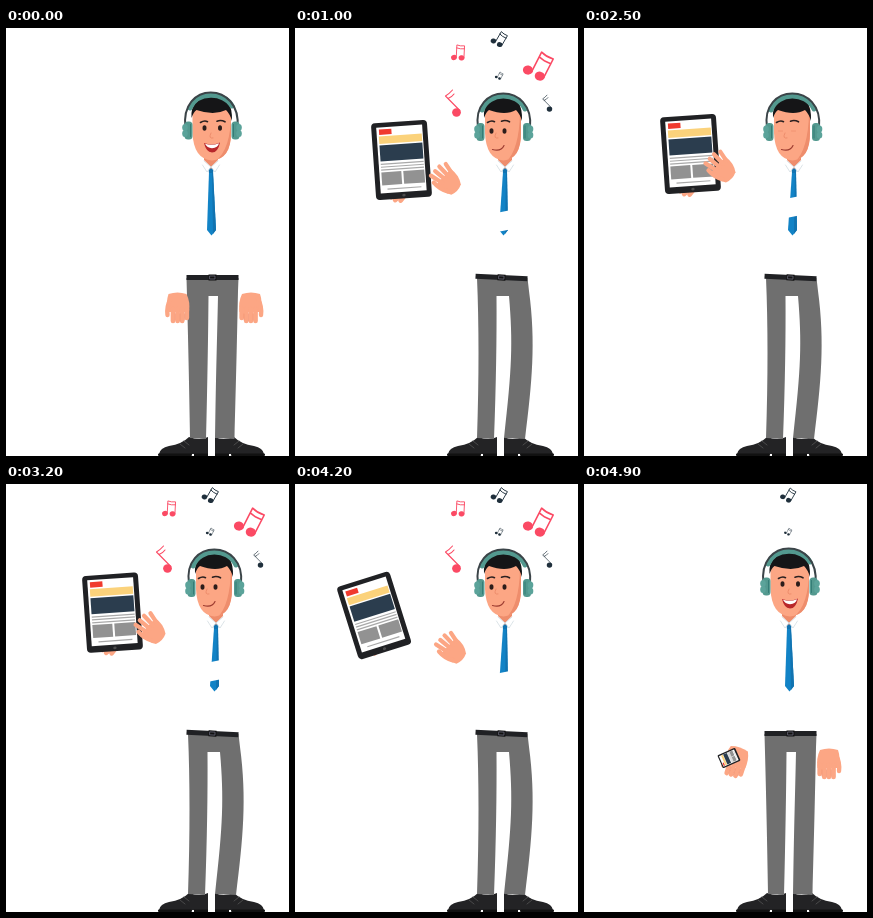
Animation, 283 px wide and 428 px high, one loop 5 s. Source, as an HTML page with a canvas:

```html
<!DOCTYPE html>
<html lang="en">
<head>
<meta charset="utf-8">
<title>Man with headphones and tablet</title>
<style>
html, body { margin: 0; width: 100%; height: 100%; overflow: hidden; background: #fff; }
canvas { display: block; width: 283px; height: 428px; }
</style>
</head>
<body>
<canvas id="stage"></canvas>
<script>
const W = 283, H = 428, LOOP = 5000, STEP = 100;
const canvas = document.getElementById('stage');
const c = canvas.getContext('2d');
const ratio = window.devicePixelRatio || 1;
canvas.width = W * ratio;
canvas.height = H * ratio;

const SKIN = '#fca684', SHADE = '#ee8d6c', GREY = '#6f6f6f', DARK = '#202124';
const TEAL = '#53998f', PINK = '#fb4a64', NAVY = '#20303c';

const clamp = v => Math.min(1, Math.max(0, v));
const mix = (a, b, k) => a + (b - a) * k;
const ramp = (t, from, to) => clamp((t - from) / (to - from));
const ease = u => u * u * (3 - 2 * u);
const backOut = u => 1 + 2.2 * (u - 1) ** 3 + 1.2 * (u - 1) ** 2;
const bezier = (a, b, d, e, u) => mix(
  mix(mix(a, b, u), mix(b, d, u), u), mix(mix(b, d, u), mix(d, e, u), u), u);
// Rises over one span of time and falls over another
const hump = (t, a, b, d, e) => ease(ramp(t, a, b)) * (1 - ease(ramp(t, d, e)));

function fill(d, color) {
  c.fillStyle = color;
  c.fill(new Path2D(d));
}
function line(d, color, width) {
  c.strokeStyle = color;
  c.lineWidth = width;
  c.stroke(new Path2D(d));
}
function rect(x, y, w, h, color, r = 0) {
  c.fillStyle = color;
  c.beginPath();
  c.roundRect(x, y, w, h, r);
  c.fill();
}
function oval(x, y, rx, ry, color, turn = 0) {
  c.fillStyle = color;
  c.beginPath();
  c.ellipse(x, y, rx, ry, turn, 0, 7);
  c.fill();
}
function at(x, y, deg, sx, sy, draw) {
  c.save();
  c.translate(x, y);
  c.rotate(deg * Math.PI / 180);
  c.scale(sx, sy);
  draw();
  c.restore();
}

function pair(color) {
  oval(-3.8, 5.2, 2.9, 2.6, color, -.3);
  oval(3.8, 5.2, 2.9, 2.6, color, -.3);
  line('M-1.5 5V-7.5Q2 -6.3 6.2 -7V5M-1.5 -4.5Q2 -3.3 6.2 -4', color, .9);
}
function single(color) {
  oval(4, 9, 4.4, 4.2, color);
  line('M7.3 7L-7 -7.5Q-4 -9 0 -13.5M-4.5 -5Q-1 -6 1.5 -9.5', color, 1.1);
}
function note(p, x, y, size, deg, color, kind) {
  // Notes near the middle come first and go last
  const far = Math.abs(x - 204), start = 100 + far * 3, leave = 2320 - far * 9;
  const s = size * backOut(clamp((p - start) / 360)) * (1 - clamp((p - leave) / 340) ** 2);
  if (p > start && s > .02) at(x, y, deg, s, s, () => kind(color));
}
function notes(t) {
  const p = t % (LOOP / 2);
  note(p, 163, 24.5, 1, 3, PINK, pair);
  note(p, 204, 10.5, .95, 30, NAVY, pair);
  note(p, 243, 37, 1.75, 27, PINK, pair);
  note(p, 204, 47.5, .48, 27, NAVY, pair);
  note(p, 157.5, 75.5, 1, 0, PINK, single);
  note(p, 252, 75.5, .62, 0, NAVY, single);
}

function hand(x, y, deg, flip, spread) {
  at(x, y, deg, flip, 1, () => {
    const wrist = 9 - 2 * spread;
    fill(`M${-wrist} -14Q0 -17 ${wrist} -14Q13 -6 11.5 4L-9 4Q-12 -6 ${-wrist} -14Z`, SKIN);
    line('M-7 -9Q-11 -2 -10 7', SKIN, 4.4);
    for (let i = 0; i < 4; i++) {
      const fx = -4.5 + i * 4.6, tip = fx + (i - 1.5) * spread * 1.6;
      line(`M${fx} 1L${tip} ${(i == 3 ? 10 : 13) + spread}`, SKIN, 4.7 - spread * .5);
    }
    line('M-2.2 6V12M2.5 6V13M7.1 6V12', SHADE, .5 - .4 * spread);
  });
}

function tablet(x, y, deg, s) {
  at(x, y, deg, s, s, () => {
    rect(-28, -38.5, 56, 77, DARK, 4);
    rect(-23, -34, 46, 66, '#fff');
    rect(-20.5, -32, 12.5, 5.5, '#f03a2e');
    rect(-21, -25, 43, 7.5, '#fbd27b');
    rect(-21, -16, 43, 16, '#2b3d4e');
    for (let i = 0; i < 3; i++) rect(-21, 2.3 + i * 2.9, 43, 1.2, '#a9a9a9');
    rect(-21, 11, 20, 13, '#929292');
    rect(1, 11, 21, 13, '#929292');
    rect(-16, 27.5, 34, 1.2, '#a9a9a9');
    oval(0, 35.2, 1.7, 1.4, '#4c4c4c');
  });
}

function shoe(x, flip) {
  at(x, 0, 0, flip, 1, () => {
    fill('M-16 409Q-5 413 3 409V426H-46Q-45 420 -36 418Q-23 416 -16 409Z', '#232325');
    rect(-47, 425.5, 34, 2.5, '#111', 1);
    rect(-11, 425.5, 14, 2.5, '#111');
    line('M-25 416L-20 420M-21 413L-16 417', '#555', .8);
  });
}

function legs(k) {
  const L = (a, b) => mix(a, b, k);
  shoe(199, 1);
  shoe(212, -1);
  fill(`M${L(180.5, 182)} 250Q${L(182.5, 185)} 320 ${L(184, 182)} 410L${L(200, 199)} 411
    Q${L(202, 202)} 330 ${L(202.5, 201.5)} 268L${L(212, 214)} 268
    C${L(211, 218)} 315 ${L(210, 217)} 340 209 410L${L(228.5, 230)} 411
    C${L(230, 237)} 355 ${L(231, 241)} 315 ${L(232, 234)} 263L232.5 250Z`, GREY);
  at(206.5, 249.5, L(0, 3), 1, 1, () => {
    rect(-26, -2.5, 52, 5, DARK);
    rect(-4, -3, 8, 6, '#111');
    line('M-2.5 -1.5H2.5V1.5H-2.5Z', '#667', .8);
  });
}

function tie(k) {
  const x = mix(205, 210, k), end = mix(205.5, 208.5, k);
  fill(`M${x - 2} 144L${end - 4.5} 202L${end} 207.5L${end + 4.5} 202L${x + 2} 144Z`, '#1283c6');
  fill(`M${x + 1} 144L${end + 1.5} 206L${end + 4.5} 202L${x + 2} 144Z`, '#1273b0');
  fill(`M${x - 3} 138H${x + 3}L${x + 2} 145H${x - 2}Z`, '#1273b0');
}

function collar(x) {
  fill(`M${x - 7} 122H${x + 7}V134L${x} 141L${x - 7} 134Z`, SHADE);
  for (const side of [-1, 1]) at(x, 0, 0, side, 1, () => {
    fill('M7 132L0 139L4 144L9 137Z', '#fff');
    line('M7 133L0 139L4 144L8.5 137', '#cdd8de', .7);
  });
}

function cup(x, y, side) {
  at(x, y, 0, side, 1, () => {
    rect(-4.5, -9, 8, 18, TEAL, 3.5);
    oval(3, -3, 2.8, 3.5, '#5ba39a');
    oval(3, 3, 2.8, 3.5, '#5ba39a');
    line('M-2.5 -6V6', '#347d77', 1);
  });
}

function head(k, blink) {
  const L = (a, b) => mix(a, b, k);
  collar(L(205, 210));

  const l = L(186.5, 190), r = L(225, 226), chin = L(206, 208.5);
  const face = `M${l} 80V105Q${l + 1} 131 ${chin} 132.5Q${r} 131 ${r} 105V80Q${chin} 66 ${l} 80Z`;
  fill(face, SKIN);
  c.save();
  c.clip(new Path2D(face));
  fill(`M${r + 2} 85H${r - k}Q${r - 2 * k} 123 ${chin + 2} 134H${r + 2}Z`, SHADE);
  c.restore();
  fill(`M${l - 1} 90Q${l - 3} 71 ${chin} 67.5Q${r + 2} 67 ${r + 1} 93
    Q${r - 1} 86 ${r - 5} 82Q${chin + 2} 88 ${l + 4} 82Q${l + 1} 84 ${l - 1} 90Z`, '#151517');

  line(`M${L(184, 187)} ${L(80, 82)}C${L(191, 194)} 63.5 ${L(218, 222)} 63.5 ${L(226, 230)} ${L(78, 81)}`, TEAL, 5);
  const top = L(52.5, 54);
  line(`M${L(179.5, 183)} 100C${L(173, 176)} ${top} ${L(236, 240)} ${top} ${L(231.5, 235)} 100`, '#3b4448', 2);
  cup(L(182, 185), L(102.5, 104), -1);
  cup(L(230, 232.5), L(102.5, 104), 1);

  const e1 = L(198.5, 196.5), e2 = L(214, 209.5), ey = L(100, 103);
  line(`M${e1 - 4} 94.5Q${e1} 92 ${e1 + 3} 93.7M${e2 - 3} 93.2Q${e2 + 1} 91.5 ${e2 + 5} 93.8`, '#2b2020', 1.6);
  for (const ex of [e1, e2]) {
    if (blink) line(`M${ex - 2} ${ey}h4`, SHADE, .8);
    else oval(ex, ey, 2, 2.8, '#2c1d1b');
  }
  const nose = L(206, 202);
  line(`M${nose - 1} 105Q${nose - 4} 111 ${nose + 1} 110`, SHADE, 1);
  if (k < .5) {
    fill('M198 115Q206 118 214 114.5Q212 124.5 206 124.5Q200 124 198 115Z', '#b8272b');
    fill('M199 115.8Q206 118 213 115.2Q212 119.5 206 120.2Q201 120 199 115.8Z', '#fff');
  } else {
    line('M197.5 121.5Q206 124 209 117.5', '#9c3b30', 1.2);
  }
}

// The white sleeve hides part of the tie
function sleeve(x) {
  const y = 172 + (x - 129) * .97;
  if (y > 222) return;
  c.lineCap = 'butt';
  line(`M188 ${y + 4}L228 ${y - 4}`, '#fff', 19);
  if (y > 194) rect(200, y, 18, 230 - y, '#fff');
  c.lineCap = 'round';
}

function draw(t) {
  const turn = hump(t, 100, 700, 4200, 4800);
  const reach = hump(t, 100, 900, 4200, 4900);
  const lift = ease(ramp(t, 100, 1000)) * (1 - ramp(t, 3700, 4900) ** 2.4);
  const bob = 3 * Math.cos(Math.PI * (t - 1000) / 1500);
  const swipe = Math.min(ramp(t, 800, 1850), 1 - ramp(t, 1850, 4200));

  const tapX = mix(245, 156 - 27 * swipe, reach);
  const tapY = mix(280, 165 - 24 * swipe ** .25 + bob * ramp(swipe, 0, .15), reach);
  const tabX = bezier(145, 30, 20, 106.5, lift);
  const tabY = bezier(274, 250, 120, 129, lift) + bob * ramp(lift, .88, 1);

  c.setTransform(ratio, 0, 0, ratio, 0, 0);
  c.fillStyle = '#fff';
  c.fillRect(0, 0, W, H);
  c.lineCap = c.lineJoin = 'round';
  notes(t);
  legs(turn);
  tie(turn);
  sleeve(tapX);
  head(turn, t >= 2400 && t < 2600);
  if (t < STEP) {
    hand(171.5, 280, 0, 1, 0);
  } else {
    hand(tabX + 6 - 8 * lift, tabY + 4 + 23 * lift, 18 + 20 * lift, 1, 0);
    tablet(tabX, tabY, -4 - 110 * (1 - lift), 1 - .75 * (1 - lift) ** 2);
  }
  hand(tapX, tapY, 133 * reach, -1, reach);
}

function frame(now) {
  draw(Math.floor((now % LOOP) / STEP) * STEP);
  requestAnimationFrame(frame);
}
draw(0);
requestAnimationFrame(frame);
</script>
</body>
</html>
```
